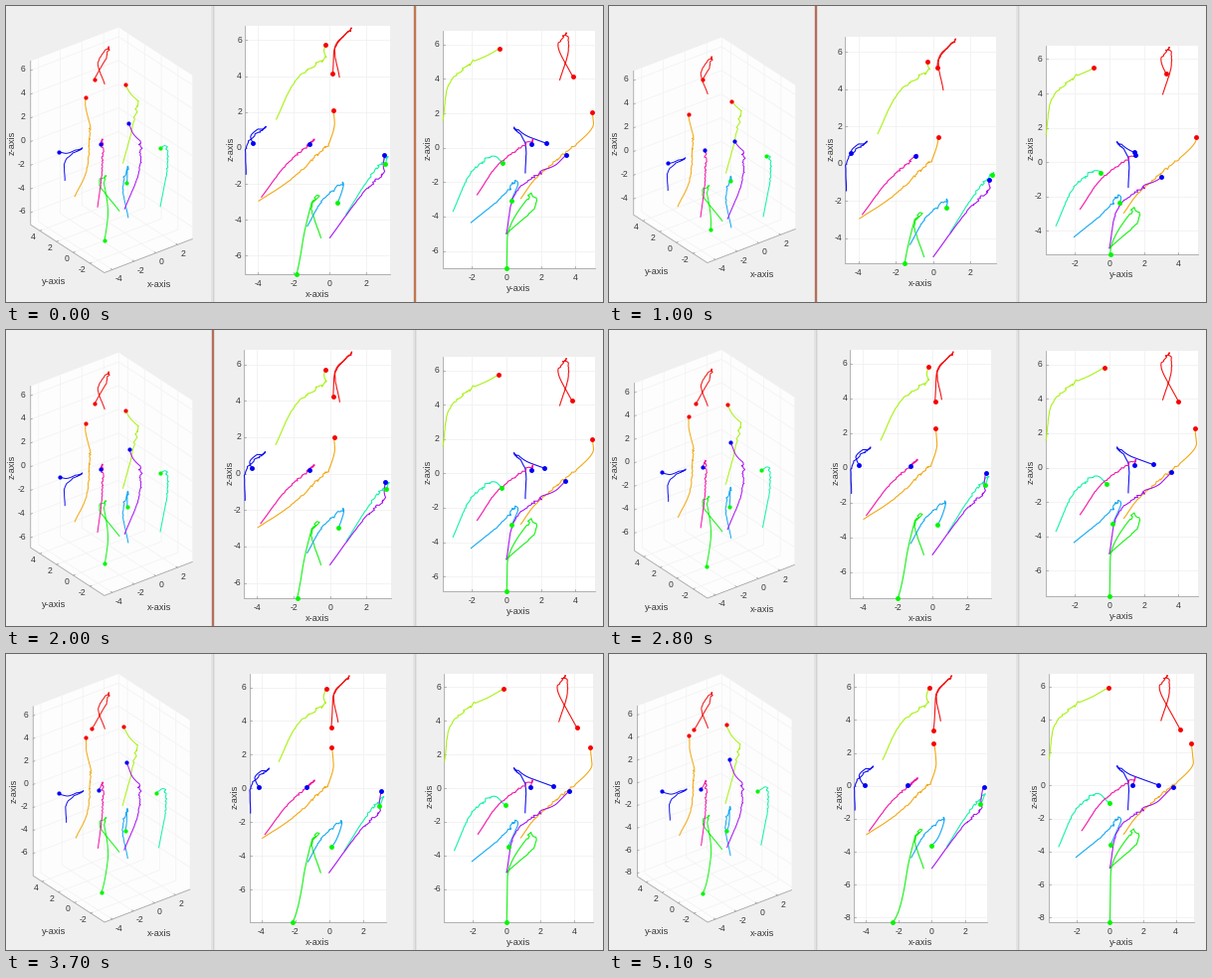
Animation of 600 by 298 pixels, one loop 5200 ms. Source, as a matplotlib script:

```python
import colorsys
import math

import matplotlib.pyplot as plt
import numpy as np
from matplotlib.animation import FuncAnimation

W, H, DPI = 600, 298, 100
FRAMES, STEP = 52, 100
PX = 72 / DPI
OPENING = 2.19                          # moment shown before the run restarts
RATES = np.array([0.2, 0.64, 0.64])     # settling speed along x, y, z
LOW = np.array([-4.73, -3.72, -5.0])
HIGH = np.array([3.37, 5.12, 6.8])
EDGE, GRID, FAINT = "#a2a2a2", "#f0f0f0", "#f3f3f3"

plt.rcParams["font.family"] = "Liberation Sans"
rng = np.random.default_rng(4)


def wander(points, rough=0.065):
    """Smooth curve through the points that grows rougher towards its end."""
    p = np.array(points, float)
    slope = np.gradient(p, axis=0)
    parts = []
    for a, b, m, n in zip(p[:-1], p[1:], slope[:-1], slope[1:]):
        count = max(2, math.ceil(np.linalg.norm(b - a) / 0.12))
        u = np.linspace(0, 1, count, endpoint=False)[:, None]
        ease = u * u * (3 - 2 * u)
        parts.append(a + (b - a) * ease
                     + m * u * (1 - u) ** 2 - n * u * u * (1 - u))
    curve = np.vstack(parts)
    growth = np.linspace(0, 1, len(curve))[:, None] ** 2
    curve += rng.normal(0, rough, curve.shape) * growth
    return np.clip(curve, LOW, HIGH)


class Agent:
    """Wanders to a turn, then settles onto the plane where `axis` is zero."""

    def __init__(self, axis, path, knot, goal):
        self.early = wander(path)
        self.turn, self.knot = np.array(path[-1]), np.array(knot)
        self.goal = np.insert(np.array(goal, float), axis, 0)

    def decay(self, t):
        return self.goal + (self.knot - self.goal) * np.exp(-RATES * (t - 1))

    def trail(self, now):
        t = np.linspace(0, now, 40)[:, None]
        blend = np.clip(1 - t, 0, 1) ** 2
        late = self.decay(t) + (self.turn - self.decay(0)) * blend
        return np.vstack([self.early, late])


# axis, path of key points, place after one second, goal inside the plane
AGENTS = [
    Agent(0, [(.53, 3.1, 3.95), (.3, 3.6, 5.6), (1.2, 3.45, 6.6), (.5, 3, 6)],
          (.21, 3.3, 5.15), (4.35, 3.25)),
    Agent(0, [(-3.95, .84, -2.95), (-2.1, 1.8, -1.7), (-.05, 4.1, .25)],
          (.26, 5.06, 1.44), (4.93, 2.65)),
    Agent(0, [(-2.98, -3.68, 1.6), (-1.9, -3.3, 3.75), (-.2, -1.85, 5.05)],
          (-.32, -.9, 5.48), (0, 6)),
    Agent(1, [(-.5, 0, -5), (-1, 1.7, -3.4), (-.65, 1.4, -2.7), (-1, 1.2, -3)],
          (-1.53, .05, -5.35), (-3.03, -8.5)),
    Agent(1, [(.9, -3.1, -3.7), (2.3, -2.1, -1.5), (3.25, -.9, -.5)],
          (3.17, -.49, -.6), (2.72, -1.12)),
    Agent(1, [(-1.25, -2.05, -4.35), (-.4, -.3, -2.9), (.7, .5, -1.9)],
          (.69, .6, -2.35), (-.61, -3.7)),
    Agent(2, [(-4.66, 1.1, -1.46), (-4.6, 1.1, .2), (-3.6, .5, 1.15),
              (-4, .7, 1.05)],
          (-4.4, 1.47, .57), (-3.81, 3.03)),
    Agent(2, [(0, 0, -5), (1.7, .5, -2.7), (3.05, 2.1, -1.3)],
          (2.98, 3.03, -.86), (3.27, 3.87)),
    Agent(2, [(-3.8, -1.7, -2.73), (-2.4, -.4, -.9), (-.85, 1.5, .45)],
          (-.95, 1.53, .42), (-1.9, 1.38)),
]
LINES = [colorsys.hsv_to_rgb(i / 9, 0.92, 0.95) for i in range(9)]
DOTS = [colorsys.hsv_to_rgb(i // 3 / 3, 1, 0.97) for i in range(9)]

fig = plt.figure(figsize=(W / DPI, H / DPI), dpi=DPI, facecolor="#f0eff0")
ax = fig.add_axes([0, 0, 1, 1])


def stroke(pts, color, width=0.8):
    x, y = np.asarray(pts, float).T
    ax.plot(x, y, color=color, lw=width * PX, solid_joinstyle="round")


def label(x, y, text, size=8.7, **kw):
    kw = {"ha": "center", "va": "center", **kw}
    ax.text(x, y, str(text), fontsize=size * PX, color="#383838", **kw)


def title(x, y, text, **kw):
    label(x, y, text, 9.3, **kw)


def ticks(lo, hi):
    return range(2 * math.ceil(lo / 2), 2 * math.floor(hi / 2) + 1, 2)


def draw_agents(trails, project, width, dot):
    shown = [project(p) for p in trails]
    for pts, color in zip(shown, LINES):
        stroke(pts, color, width)
    for pts, color in zip(shown, DOTS):
        ax.plot(*pts[-1], "o", color=color, ms=dot * PX, mew=0)


def flat_view(trails, low, axis, name, cx, cy, max_w, max_h):
    lo, hi = low[[axis, 2]], HIGH[[axis, 2]]
    s = min(max_w / (hi[0] - lo[0]), max_h / (hi[1] - lo[1]))
    mid = (lo + hi) / 2

    def project(p):
        return np.array([cx, cy]) + s * (p[:, [axis, 2]] - mid) * [1, -1]

    (x0, y1), (x1, y0) = project(np.array([low, HIGH]))
    ax.fill([x0, x1, x1, x0], [y0, y0, y1, y1], color="white", lw=0)
    for v in ticks(lo[0], hi[0]):
        x = cx + s * (v - mid[0])
        stroke([(x, y0), (x, y1)], GRID)
        stroke([(x, y1), (x, y1 - 2)], EDGE)
        label(x, y1 + 9.5, v)
    for v in ticks(lo[1], hi[1]):
        y = cy - s * (v - mid[1])
        stroke([(x0, y), (x1, y)], GRID)
        stroke([(x0, y), (x0 + 2, y)], EDGE)
        label(x0 - 3, y, v, ha="right")
    stroke([(x0, y0), (x0, y1), (x1, y1)], EDGE)
    title(cx, y1 + 20.5, name)
    title(x0 - 14, cy - 1.5, "z-axis", rotation=90)
    draw_agents(trails, project, 1.1, 4.9)


def space_view(trails, low):
    az, el = math.radians(37.5), math.radians(30)
    right = np.array([math.cos(az), -math.sin(az), 0])
    up = np.array([math.sin(az) * math.sin(el),
                   math.cos(az) * math.sin(el), math.cos(el)])
    size, mid = HIGH - low, (low + HIGH) / 2
    s = min(162.5 / (size @ abs(right)), 250 / (size @ up))

    def project(p):
        d = np.asarray(p, float) - mid
        return np.stack([106 + s * d @ right, 145 - s * d @ up], axis=-1)

    (xa, ya, za), (xb, yb, zb) = low, HIGH
    hexagon = [(xa, ya, za), (xb, ya, za), (xb, ya, zb),
               (xb, yb, zb), (xa, yb, zb), (xa, yb, za)]
    ax.fill(*project(hexagon).T, color="#fdfdfd", lw=0)

    for v in ticks(xa, xb):
        stroke(project([(v, ya, za), (v, yb, za), (v, yb, zb)]), FAINT)
        x, y = project((v, ya, za))
        stroke([(x, y), (x - 1.3, y - 1)], EDGE)
        label(x + 3, y + 9, v, ha="left")
    for v in ticks(ya, yb):
        stroke(project([(xa, v, za), (xb, v, za), (xb, v, zb)]), FAINT)
        x, y = project((xa, v, za))
        stroke([(x, y), (x + 1.6, y - 0.7)], EDGE)
        label(x - 4, y + 6.5, v, ha="right")
    for v in ticks(za, zb):
        stroke(project([(xa, yb, v), (xb, yb, v), (xb, ya, v)]), FAINT)
        x, y = project((xa, yb, v))
        stroke([(x, y), (x + 1.6, y - 0.7)], EDGE)
        label(x - 5, y - 1, v, ha="right")
    stroke(project([(xb, yb, za), (xb, yb, zb)]), FAINT)
    edges = project([(xa, yb, zb), (xa, yb, za), (xa, ya, za), (xb, ya, za)])
    stroke(edges, EDGE)

    left, bottom = edges[0][0], edges[2][1]
    title(left - 19, edges[:2, 1].mean(), "z-axis", rotation=90)
    title(48, bottom + 9, "y-axis")
    title(154, bottom + 12, "x-axis")
    draw_agents(trails, project, 1.0, 4.2)


def gap(x, color=None):
    """Seam between two windows, coloured where the desktop shows through."""
    stroke([(x, 0), (x, H)], "#e4e2e3", 4)
    stroke([(x, 0), (x, H)], color or "#d2d2d4", 2.2 if color else 1)


def draw(k):
    ax.clear()
    ax.set(xlim=(0, W), ylim=(H, 0))
    ax.axis("off")
    t = k * STEP / 1000 if k else OPENING
    trails = [a.trail(t) for a in AGENTS]
    low = LOW.copy()
    low[2] = min(p[:, 2].min() for p in trails)

    gap(207.5, "#b56e5a" if 0 < k < 27 else None)
    gap(411, None if k else "#c07850")
    space_view(trails, low)
    flat_view(trails, low, 0, "x-axis", 313.2, 145, 152, 250)
    flat_view(trails, low, 1, "y-axis", 515, 144.7, 153, 250)


anim = FuncAnimation(fig, draw, frames=FRAMES, interval=STEP, repeat=True)
plt.show()
```
